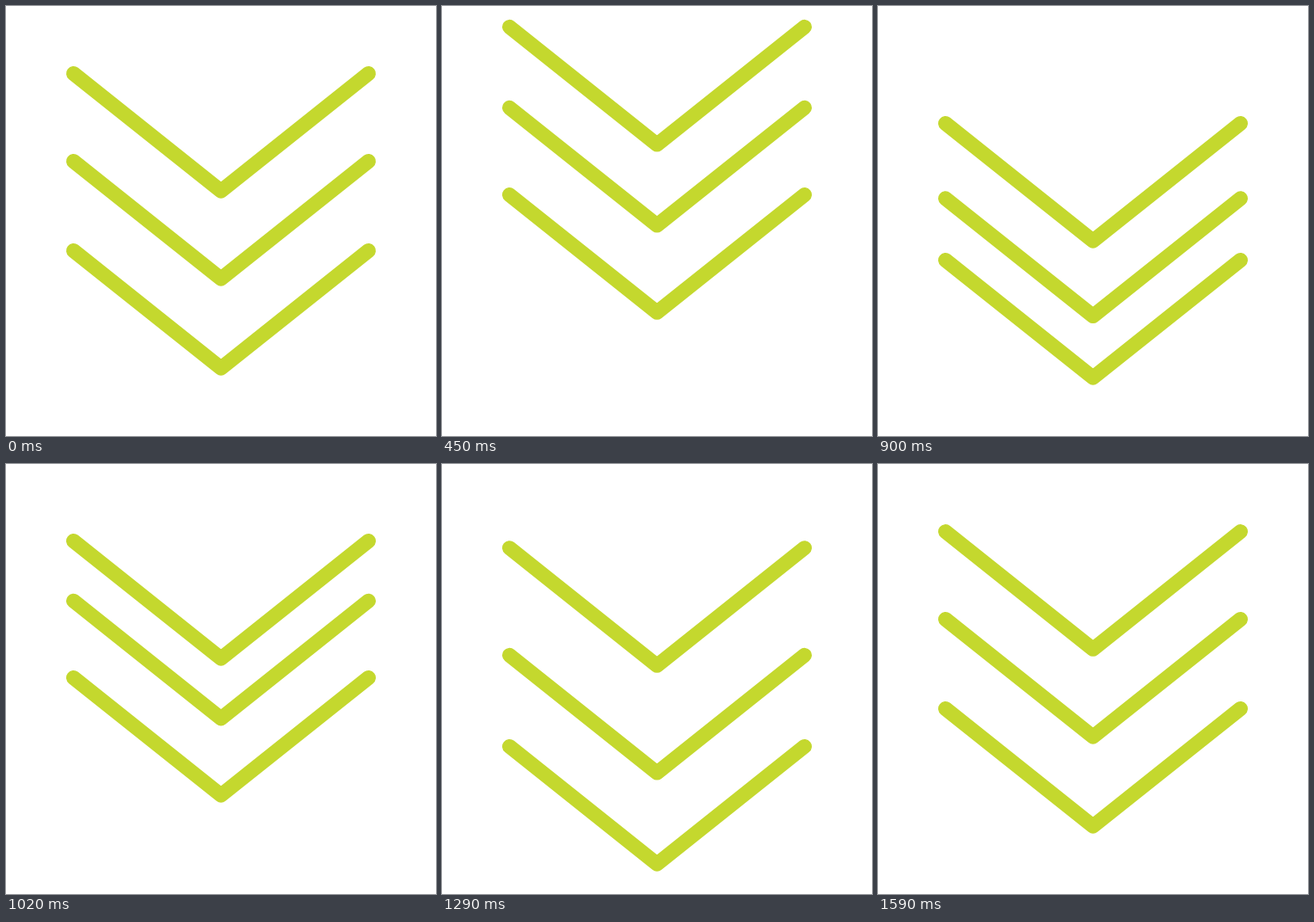
An HTML page for the animation above (1.8 s loop, 500 px wide and 500 px high).

```html
<!DOCTYPE html>
<html lang="en">
<head>
<meta charset="utf-8">
<title>Bouncing chevrons</title>
<style>
  html, body { margin: 0; height: 100%; overflow: hidden; background: #fff; }
  svg { display: block; width: 100vw; height: 100vh; }
  path { fill: none; stroke: #c4d82e; stroke-width: 17; stroke-linecap: round; stroke-linejoin: round; }
</style>
</head>
<body>
<svg viewBox="0 0 500 500">
  <path d="M78.5 0 250 136.7 421.5 0"/>
  <path d="M78.5 0 250 136.7 421.5 0"/>
  <path d="M78.5 0 250 136.7 421.5 0"/>
</svg>
<script>
  const LOOP = 1800, STEP = 30;
  const restY = [78.5, 180.5, 284.5];
  const delays = [4, 2, 0]; // in steps; the lowest chevron leads
  // [step, vertical offset], eased in and out between neighbours
  const keys = [[0, 0], [14.85, -65], [26, 58], [34, -36], [42.1, 46], [49.2, 0]];
  const chevrons = document.querySelectorAll('path');

  function offsetAt(step) {
    if (step <= 0) return 0;
    const next = keys.findIndex(([time]) => time > step);
    if (next < 0) return 0;
    const [t0, y0] = keys[next - 1], [t1, y1] = keys[next];
    const u = (step - t0) / (t1 - t0);
    return y0 + (y1 - y0) * u * u * (3 - 2 * u);
  }

  function draw() {
    // The last pose holds until the loop restarts
    const step = Math.min(53, Math.floor(performance.now() % LOOP / STEP));
    chevrons.forEach((chevron, i) => {
      const y = restY[i] + offsetAt(step - delays[i]);
      chevron.setAttribute('transform', `translate(0 ${y.toFixed(2)})`);
    });
    requestAnimationFrame(draw);
  }
  draw();
</script>
</body>
</html>
```
